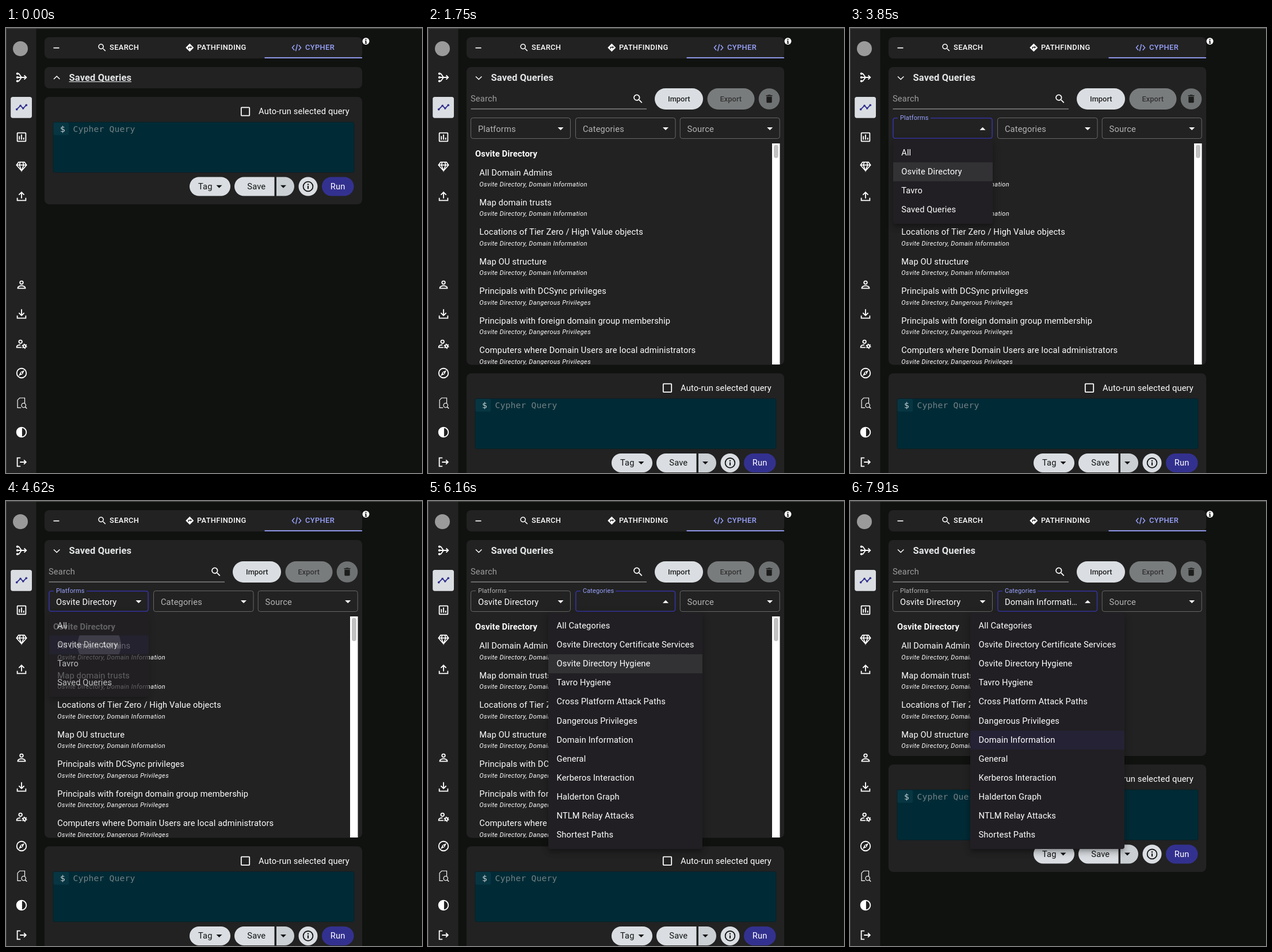
An HTML page for the animation above (8000 ms loop, 723x775 px).

```html
<!DOCTYPE html>
<html lang="en">
<head>
<meta charset="utf-8">
<title>Saved queries</title>
<style>
  html, body { margin: 0; width: 100%; height: 100%; overflow: hidden; background: #101210; }
  #stage { position: relative; width: 723px; height: 775px; overflow: hidden; font: 14.7px Roboto, sans-serif; letter-spacing: .138px; color: #fff; }
  svg { position: absolute; left: 0; top: 0; }
  text { fill: #fff; white-space: pre; }
  .tab { font-size: 12.87px; font-weight: 500; letter-spacing: .37px; }
  .title { font-size: 16.5px; font-weight: 700; }
  .head { font-weight: 700; }
  .sub { font-size: 11.03px; font-style: italic; letter-spacing: .37px; }
  .pill { font-size: 12.87px; font-weight: 500; letter-spacing: 0; text-anchor: middle; }
  .btn { text-anchor: middle; }
  .mono { font-family: "DejaVu Sans Mono", monospace; }
  .line { fill: none; stroke: #fff; stroke-width: 2; }
  .menu { position: absolute; top: 193.5px; padding: 7.4px 0; background: #211f23; border-radius: 4px; transform-origin: 50% 0;
    box-shadow: 0 5px 5px -3px #0003, 0 7px 9px 1px #00000024, 0 3px 13px 2px #0000001f; }
  .row { position: relative; height: 33.14px; line-height: 33.14px; padding-left: 14.7px; overflow: hidden; white-space: nowrap; }
  .row.hover { background: #ffffff14; }
  .row.picked { background: #33318f29; }
  .ripple { position: absolute; border-radius: 50%; background: #fff; }
</style>
</head>
<body>
<div id="stage"></div>
<script>
const LOOP = 8000, STEP = 70;
const PANEL = '#222222', LIGHT = '#dadee2', INDIGO = '#33318f', LILAC = '#99a3ff';
const DIR = 'Osvite Directory';
const PLATFORMS = ['All', DIR, 'Tavro', 'Saved Queries'];
const CATEGORIES = ['All Categories', DIR + ' Certificate Services', DIR + ' Hygiene', 'Tavro Hygiene',
  'Cross Platform Attack Paths', 'Dangerous Privileges', 'Domain Information', 'General',
  'Kerberos Interaction', 'Halderton Graph', 'NTLM Relay Attacks', 'Shortest Paths'];
const QUERIES = ['All Domain Admins', 'Map domain trusts', 'Locations of Tier Zero / High Value objects',
  'Map OU structure', 'Principals with DCSync privileges', 'Principals with foreign domain group membership',
  'Computers where Domain Users are local administrators'];

// Pointer position over the menu rows: [time, row]
const PLATFORM_HOVER = [[3780, 0], [3850, 1], [3920, 2], [4130, 1]];
const CATEGORY_HOVER = [[6090, 0], [6160, 2], [6230, 3], [6300, 5], [6370, 6]];

const clamp = v => Math.min(1, Math.max(0, v));
const mix = (a, b, p) => a + (b - a) * p;

function bezier(x1, y1, x2, y2) {
  const at = (a, b, s) => 3 * a * s * (1 - s) ** 2 + 3 * b * s * s * (1 - s) + s ** 3;
  return x => {
    x = clamp(x);
    let lo = 0, hi = 1;
    for (let i = 0; i < 24; i++) {
      const mid = (lo + hi) / 2;
      if (at(x1, x2, mid) < x) lo = mid; else hi = mid;
    }
    return at(y1, y2, lo);
  };
}
const easeInOut = bezier(.4, 0, .2, 1), easeOut = bezier(0, 0, .2, 1);

const text = (x, y, str, cls = '', extra = '') => `<text x="${x}" y="${y}" class="${cls}" ${extra}>${str}</text>`;
const box = (x, y, w, h, r, fill, extra = '') => `<rect x="${x}" y="${y}" width="${w}" height="${h}" rx="${r}" fill="${fill}" ${extra}/>`;
const circle = (x, y, r, fill, extra = '') => `<circle cx="${x}" cy="${y}" r="${r}" fill="${fill}" ${extra}/>`;
const fillPath = (d, fill = '#fff') => `<path d="${d}" fill="${fill}"/>`;
const line = (d, extra = '') => `<path class="line" d="${d}" ${extra}/>`;
const ring = (x, y, r) => `<circle class="line" cx="${x}" cy="${y}" r="${r}"/>`;
const icon = (x, y, k, body) => `<g transform="translate(${x} ${y}) scale(${k}) translate(-12 -12)">${body}</g>`;
const caret = (x, y, up, fill = '#fff') => fillPath(up ? `M${x - 5} ${y + 2.5}h10l-5-5z` : `M${x - 5} ${y - 2.3}h10l-5 5z`, fill);

const LENS = fillPath('M15.5 14h-.79l-.28-.27A6.47 6.47 0 0 0 16 9.5 6.5 6.5 0 1 0 9.5 16c1.61 0 3.09-.59 4.23-1.57l.27.28v.79l5 4.99L20.49 19l-4.99-5zm-6 0C7.01 14 5 11.99 5 9.5S7.01 5 9.5 5 14 7.01 14 9.5 11.99 14 9.5 14z');
const TRAY = 'M4 15v5h16v-5';
const SIDE_ICONS = [
  [86, line('M4 5h3l5 7M4 19h3l5-7M4 12h17M17 8l4 4-4 4') + [5, 12, 19].map(y => circle(4.2, y, 2.2, '#fff')).join('')],
  [138, `<path d="M3 16l7-7 5 5 6-6" fill="none" stroke="${INDIGO}" stroke-width="2"/>` +
    [[3, 16], [10, 9], [15, 14], [21, 8]].map(p => circle(...p, 2, INDIGO)).join('')],
  [190, '<rect class="line" x="4" y="4" width="16" height="16" rx="1"/>' + line('M8 17v-7M12 17V7M16 17v-4')],
  [241, line('M6.5 4h11L21.5 9.5 12 20.5 2.5 9.5zM2.5 9.5h19M9.5 4 8 9.5l4 11 4-11L14.5 4', 'style="stroke-width:1.8"')],
  [293, line('M12 16V5M7 9.5l5-5 5 5' + TRAY)],
  [447, ring(12, 8, 3) + line('M5 19v-1c0-2.5 4.5-4 7-4s7 1.5 7 4v1z')],
  [498, line('M12 3v12M7 10l5 5 5-5' + TRAY)],
  [550, ring(10, 8, 3) + line('M12 19H3v-1.5c0-2.2 3.5-3.5 7-3.5') + ring(17.5, 16.5, 2.4) +
    '<circle class="line" cx="17.5" cy="16.5" r="4" stroke-dasharray="2.1 2.1" style="stroke-width:1.8"/>'],
  [601, ring(12, 12, 9) + fillPath('M17.5 6.5 14 14l-7.5 3.5L10 10z') + circle(12, 12, 1.3, PANEL)],
  [653, line('M11 21H4.5V6.5l4-4H18V12', 'style="stroke-width:1.3"') +
    circle(16, 16.5, 4, 'none', 'stroke="#fff" stroke-width="1.3"') + line('M19 19.5l3 3', 'style="stroke-width:1.5"')],
  [704, fillPath('M12 22c5.52 0 10-4.48 10-10S17.52 2 12 2 2 6.48 2 12s4.48 10 10 10zm1-17.93c3.94.49 7 3.85 7 7.93s-3.05 7.44-7 7.93V4.07z')],
  [756, line('M10 4H4v16h6M9 12h11M16.5 8l4 4-4 4')]
];

const infoMark = (x, y, r, ink) => circle(x, y - r * .42, r * .14, ink) + box(x - r * .12, y - r * .12, r * .24, r * .62, 0, ink);

const FIXED =
  box(1, 1, 51.5, 774, 0, PANEL) + box(0, 0, 723, 1.3, 0, '#4a4c4a') + box(0, 0, 1, 775, 0, '#3c3e3c') +
  circle(25, 36, 13, '#9a9a9a') + box(8.2, 119.9, 36.8, 36.8, 3.7, LIGHT) +
  SIDE_ICONS.map(([y, body]) => icon(27, y, .92, body)).join('') +
  box(67, 16, 552, 37, 8, PANEL) + box(449.5, 50.9, 169.5, 1.84, 0, LILAC) +
  box(82.5, 33.8, 10, 1.7, 0, '#fff') +
  icon(167, 34.2, .75, LENS) + text(180, 38.4, 'SEARCH', 'tab') +
  icon(319.3, 34.2, .68, fillPath('M21.71 11.29l-9-9a1 1 0 0 0-1.41 0l-9 9a1 1 0 0 0 0 1.41l9 9c.39.39 1.02.39 1.41 0l9-9a1 1 0 0 0 0-1.41zM14 14.5V12h-4v3H8v-4c0-.55.45-1 1-1h5V7.5l3.5 3.5-3.5 3.5z')) +
  text(332, 38.4, 'PATHFINDING', 'tab') +
  icon(505, 34.2, .75, `<path d="M7 6 2 12l5 6M17 6l5 6-5 6M14 4l-4 16" fill="none" stroke="${LILAC}" stroke-width="2"/>`) +
  text(520, 38.4, 'CYPHER', 'tab', `style="fill:${LILAC}"`) +
  circle(625.5, 23, 6, '#fff') + circle(625.5, 19.9, 1.1, '#101210') + fillPath('M623.8 22h2.6v4h1v1.2h-3.8V26h1v-2.8h-.8z', '#101210');

function queryPanel(top) {
  const body =
    box(67, 0, 552, 187, 8, PANEL) +
    box(408.8, 18.3, 14.4, 14.4, 1, 'none', 'stroke="#fff" stroke-width="1.8"') +
    text(439, 30.3, 'Auto-run selected query') +
    box(82, 44, 523, 87.5, 3, '#002b36', 'stroke="#0b2027"') + box(82.5, 44.5, 26.5, 22, 2, '#073642') +
    text(94, 60.8, '$', 'mono', 'style="fill:#c9d1d2"') +
    text(116.6, 60.8, 'Cypher Query', 'mono', 'style="fill:#728084"') +
    box(319, 139.5, 71, 33, 16.5, LIGHT) + text(346.3, 161.1, 'Tag', 'btn', 'style="fill:#121212"') + caret(370.5, 156, false, '#121212') +
    fillPath('M466.5 139.5H413.5a16.5 16.5 0 0 0 0 33h53z', LIGHT) + text(435.3, 161.1, 'Save', 'btn', 'style="fill:#121212"') +
    fillPath('M470 139.5h14.5a16.5 16.5 0 0 1 0 33H470z', '#cacfd3') + caret(482, 156, false, '#121212') +
    circle(525, 156, 16.5, LIGHT) + circle(525, 156, 8.4, 'none', 'stroke="#121212" stroke-width="1.8"') + infoMark(525, 156, 8.6, '#121212') +
    box(549, 139.5, 55.5, 33, 16.5, INDIGO) + text(576.7, 161.1, 'Run', 'btn');
  return `<g transform="translate(0 ${top})">${body}</g>`;
}

// mode: 'idle', 'hover' or 'focus'; lift: how far the label has floated up
function select(x, w, label, { mode = 'idle', lift = 0, value = '', up = false }) {
  const stroke = { idle: '#686868', hover: '#fff', focus: INDIGO }[mode];
  const width = mode === 'focus' ? 1.84 : 1, inset = width / 2;
  const size = mix(14.7, 11.03, lift), gap = label === 'Platforms' ? 57 : 61;
  return box(x + inset, 156 + inset, w - width, 37 - width, 3.7, 'none', `stroke="${stroke}" stroke-width="${width}"`) +
    (lift > 0 ? box(x + 9, 155, gap * lift, 3, 0, PANEL) : '') +
    text(x + 12.9, mix(180.5, 160.3, lift), label, '', `style="font-size:${size}px;fill:${mode === 'focus' ? LILAC : '#b4b4b4'}"`) +
    text(x + 12.9, 180.5, value) + caret(x + w - 17.5, 175.3, up);
}

function savedPanel(t, bottom) {
  const open = t >= 560, narrowed = t >= 7140;
  let out = box(67, 68, 552, bottom - 68, 8, PANEL) +
    line(open ? 'M83 84.5l5.2 5 5.2-5' : 'M83 89l5.2-5 5.2 5', 'style="stroke-width:1.5"') +
    text(109.5, 92, 'Saved Queries', 'title', 'style="fill:#e2e4e6"') +
    (t < 1610 ? box(109.5, 93, 108.5, 1.1, 0, '#e2e4e6') : '');
  if (!open) return out;

  const overSearch = t === 1610;
  out += text(74, 128.3, 'Search', '', 'style="fill:#9c9c9c"') +
    box(74.5, 140.5, 305.5, overSearch ? 1.84 : .92, 0, overSearch ? '#fff' : '#bcbcbc') + icon(365, 123.3, .87, LENS) +
    box(394, 105, 84, 37, 18.5, LIGHT) + text(436.3, 128, 'Import', 'pill', 'style="fill:#222"') +
    box(485.5, 105, 82, 37, 18.5, '#797c7d') + text(526.3, 128, 'Export', 'pill', 'style="fill:#333"') +
    circle(593, 123.5, 18.3, '#6f7273') +
    icon(593, 123.3, .78, fillPath('M6 19c0 1.1.9 2 2 2h8c1.1 0 2-.9 2-2V7H6v12zM19 4h-3.5l-1-1h-5l-1 1H5v2h14V4z', '#1c1c1c'));

  const within = (a, b) => t >= a && t < b;
  out += select(74, 174, 'Platforms', {
    mode: within(3290, 5530) ? 'focus' : within(1680, 1750) || within(3010, 3290) ? 'hover' : 'idle',
    lift: easeOut((t - 3265) / 184), value: t >= 4550 ? DIR : '', up: within(3290, 4550)
  });
  out += select(256, 174.5, 'Categories', {
    mode: t >= 5530 ? 'focus' : t >= 5040 ? 'hover' : 'idle',
    lift: easeOut((t - 5500) / 184), value: narrowed ? 'Domain Informati…' : '', up: t >= 5530
  });
  out += select(437.7, 174, 'Source', {});

  const list = text(82, 223.8, DIR, 'head') + QUERIES.slice(0, narrowed ? 4 : 7).map((name, i) => {
    const y = 257 + i * 51.55;
    return text(89.3, y, name) + text(89.3, y + 18.5, `${DIR}, ${i < 4 ? 'Domain Information' : 'Dangerous Privileges'}`, 'sub');
  }).join('');
  out += `<clipPath id="list"><rect x="67" y="200" width="552" height="${bottom - 200.2}"/></clipPath><g clip-path="url(#list)">${list}</g>`;
  if (!narrowed) out += box(598, 201, 13.5, 385, 0, '#fff') + box(601, 203.5, 7.8, t < 4550 ? 23 : 40.5, 3.9, '#c1c1c1');
  return out;
}

function rowAt(track, t) {
  let row = -1;
  for (const [time, r] of track) if (t >= time) row = r;
  return row;
}

function ripple(t, { x, y, press, release, radius }) {
  if (t < press || t > release + 550) return '';
  const p = easeInOut((t - press) / 550), r = radius * p;
  const alpha = mix(.1, .3, p) * (1 - easeInOut((t - release) / 550));
  return `<div class="ripple" style="left:${x - r}px;top:${y - r}px;width:${2 * r}px;height:${2 * r}px;opacity:${alpha}"></div>`;
}

function menu(t, { items, x, w, start, end, time, hover, pick, pickTime, tap }) {
  if (t < start || t > end + time) return '';
  const closing = t >= end;
  const fade = closing ? 1 - easeInOut((t - end) / time) : easeInOut((t - start) / time);
  const grow = closing ? 1 - easeInOut((t - end - time * .333) / (time * .666)) : easeInOut((t - start) / (time * .666));
  const over = rowAt(hover, t);
  const rows = items.map((name, i) => {
    const cls = i === pick && t >= pickTime ? 'picked' : i === over ? 'hover' : '';
    return `<div class="row ${cls}">${name}${i === pick ? ripple(t, tap) : ''}</div>`;
  }).join('');
  return `<div class="menu" style="left:${x}px;width:${w}px;opacity:${fade};transform:scale(${mix(.75, 1, grow)},${mix(.5625, 1, grow)})">${rows}</div>`;
}

const MENUS = [
  { items: PLATFORMS, x: 74.5, w: 173.5, start: 3265, end: 4550, time: 255, hover: PLATFORM_HOVER, pick: 1, pickTime: 4550,
    tap: { x: 87.5, y: 16.5, press: 4445, release: 4540, radius: 90 } },
  { items: CATEGORIES, x: 208.8, w: 268.5, start: 5502, end: Infinity, time: 338, hover: CATEGORY_HOVER, pick: 6, pickTime: 7140,
    tap: { x: 92, y: 16.5, press: 7065, release: 7135, radius: 136 } }
];

const stage = document.getElementById('stage');

function draw(t) {
  const top = t < 560 ? 120 : t < 7140 ? 601.4 : 458.9;
  stage.innerHTML = `<svg width="723" height="775">${FIXED}${savedPanel(t, top - 15)}${queryPanel(top)}</svg>` +
    MENUS.map(m => menu(t, m)).join('');
}

const began = performance.now();
let shown = -1;
function tick() {
  const t = Math.floor(((performance.now() - began) % LOOP) / STEP) * STEP;
  if (t !== shown) draw(shown = t);
  requestAnimationFrame(tick);
}
tick();
</script>
</body>
</html>
```
